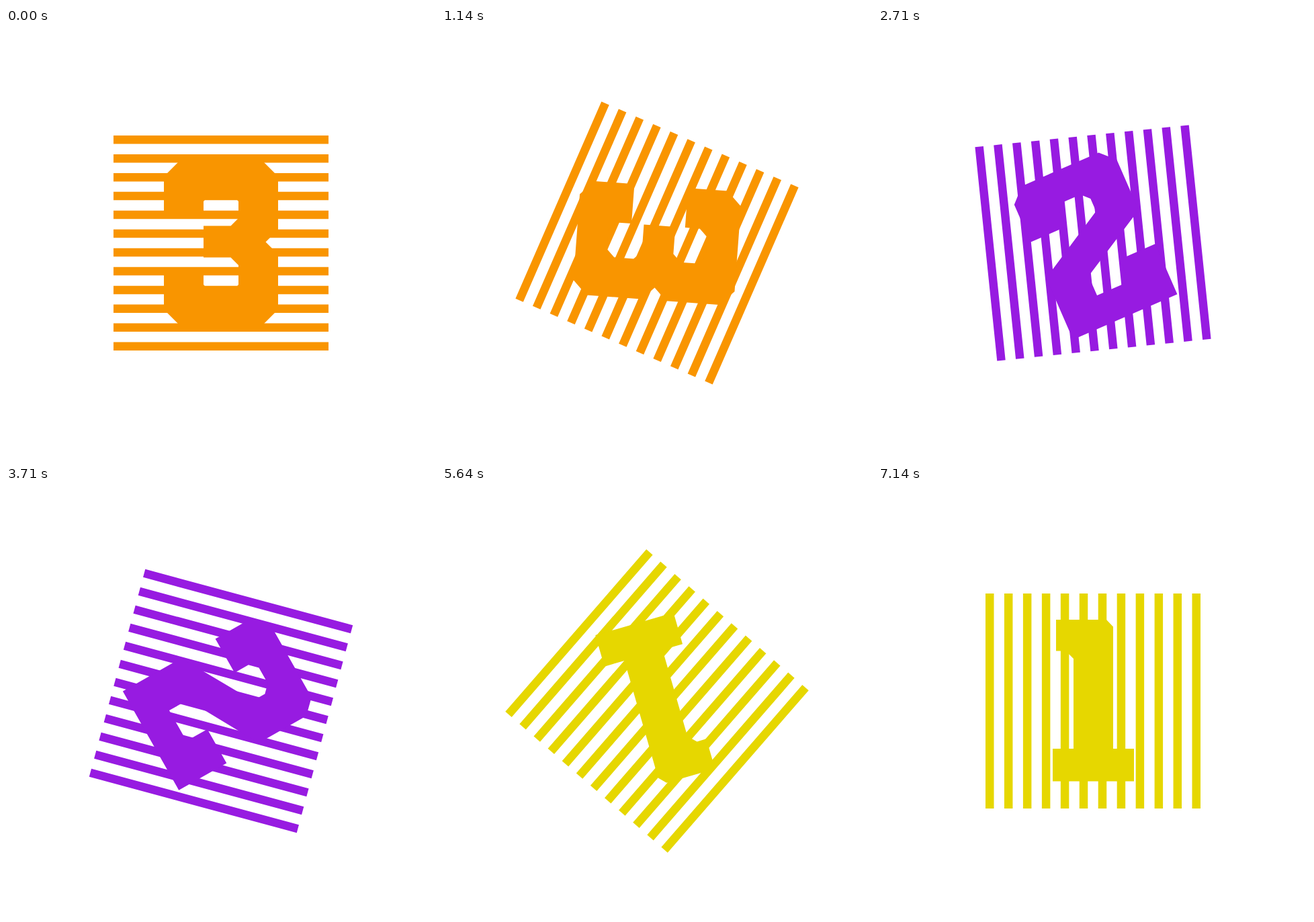
Animation, 640 px wide and 640 px high, one loop 7.21 s. Source, as an HTML page:

```html
<!DOCTYPE html>
<html lang="en">
<head>
<meta charset="utf-8">
<title>Countdown</title>
<style>
  html, body { margin: 0; width: 100%; height: 100%; overflow: hidden; background: #fff; }
  svg { display: block; width: 100%; height: 100%; }
</style>
</head>
<body>
<svg viewBox="-320 -320 640 640">
  <g id="scene">
    <path id="stripes"/>
    <path id="digit"/>
  </g>
</svg>
<script>
const LOOP = 7210;
const FRAMES = 101;

const STEPS = [
  { color: '#f99500', stripeStart: 0, shape:
    `M-63.5-120.5 H63.5 L85-99 V-20 L66.5-1.5 L85 17 V99 L64 120 H-64 L-85 99
     V40 H-26 V62 L-14 74 H14 L26 62 V33 L14.5 21.5 H-26 V-25.5 H14.5 L26-37
     V-62 L14-74 H-14 L-26-62 V-40 H-85 V-99 Z` },
  { color: '#971be1', stripeStart: 90, shape:
    `M-63.5-120 H61.5 L82-99.5 V-18 L-25.7 42.5 V74 H19.5 L26.5 67 V38.3 H84.5
     V120 H-84.7 V20 L23-41.5 V-62 L11.5-73.5 H-15.3 L-26.7-62 V-38.3 H-84.7 V-99 Z` },
  { color: '#e6d700', stripeStart: 0, shape:
    `M-55-121 H20 L30-110.5 V71 H61 V119.5 H-60 V71 H-29 V-63 L-40.5-74.5 H-55 Z` }
];

const scene = document.getElementById('scene');
const stripes = document.getElementById('stripes');
const digit = document.getElementById('digit');

const BAR = 12.5, BARS = 12, SIDE = 320;
const pitch = (SIDE - BAR) / (BARS - 1);
stripes.setAttribute('d', Array.from({ length: BARS }, (_, i) =>
  `M${-SIDE / 2} ${-SIDE / 2 + i * pitch} h${SIDE} v${BAR} h${-SIDE} z`).join(''));

// Cubic Bézier easing with control points (x1, 0) and (x2, 1).
function ease(x, x1 = 0.365, x2 = 0.235) {
  const curve = (s, a, b) => 3 * s * (1 - s) ** 2 * a + 3 * s * s * (1 - s) * b + s ** 3;
  let low = 0, high = 1;
  for (let i = 0; i < 30; i++) {
    const mid = (low + high) / 2;
    if (curve(mid, x1, x2) < x) low = mid; else high = mid;
  }
  return curve((low + high) / 2, 0, 1);
}

function draw(time) {
  const tick = Math.floor((time % LOOP) / 10) * 10;
  const frame = Math.min(FRAMES - 1, Math.floor((tick + 5) * FRAMES / LOOP));
  const position = frame * STEPS.length / (FRAMES - 1);
  const index = Math.min(STEPS.length - 1, Math.floor(position));
  const { color, stripeStart, shape } = STEPS[index];
  const progress = ease(position - index);

  scene.setAttribute('fill', color);
  digit.setAttribute('d', shape);
  digit.setAttribute('transform', `rotate(${-360 * progress})`);
  stripes.setAttribute('transform', `rotate(${stripeStart - 90 * progress})`);
}

const start = performance.now();
function loop() {
  draw(performance.now() - start);
  requestAnimationFrame(loop);
}
loop();
</script>
</body>
</html>
```
